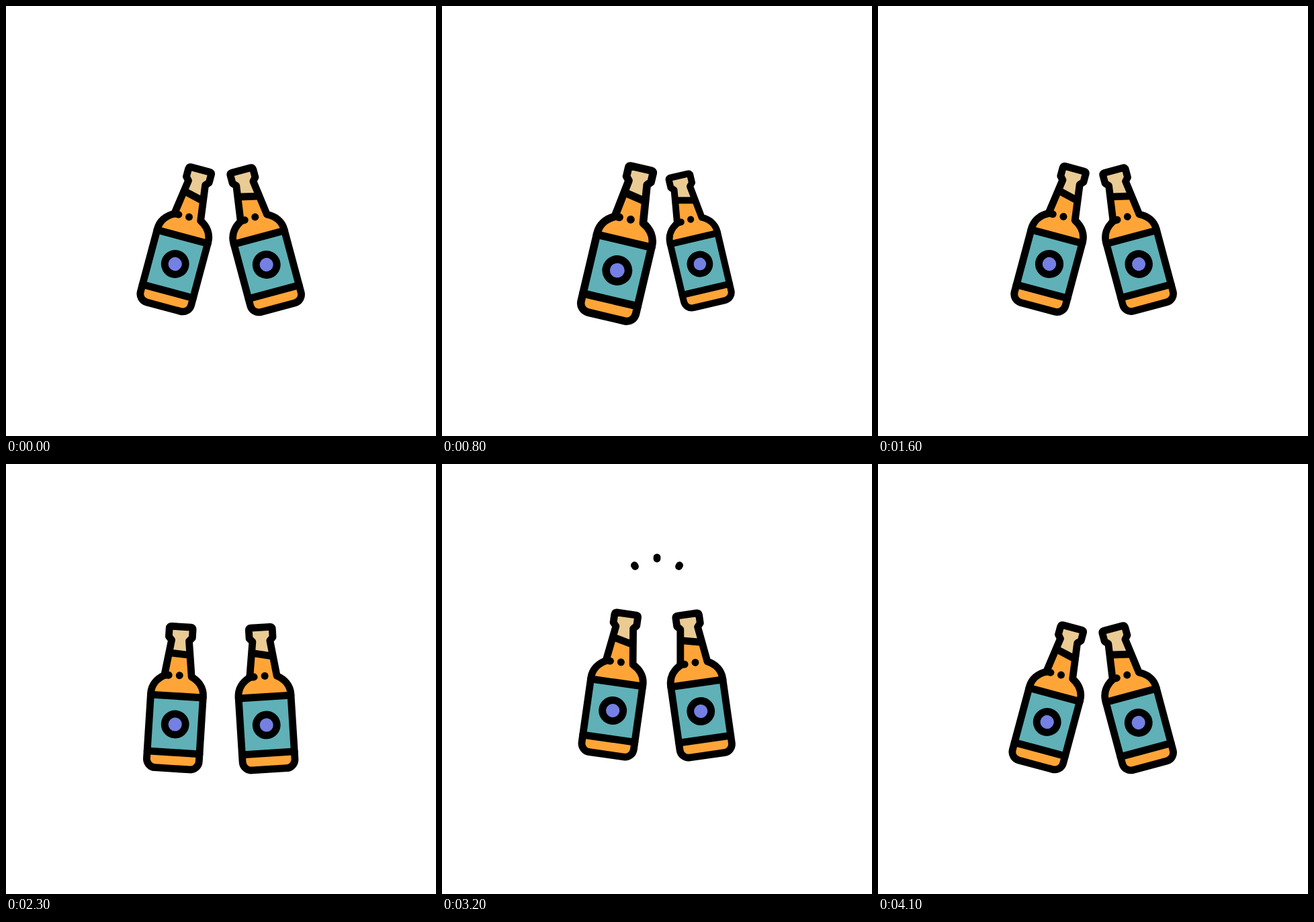
An HTML page for the animation above (4.2 s loop, 640 by 640 pixels).

```html
<!DOCTYPE html>
<html lang="en">
<head>
<meta charset="utf-8">
<title>Cheers</title>
<style>
  html, body { margin: 0; width: 100%; height: 100%; overflow: hidden; background: #fff; }
  svg { display: block; width: 100vw; height: 100vh; }
  .ink { fill: none; stroke: #000; stroke-width: 10.8; stroke-linecap: round; stroke-linejoin: round; }
</style>
</head>
<body>
<svg viewBox="0 0 640 640">
  <defs>
    <path id="shape" d="M-20.5-72L-13-125L-17.5-130V-142.5Q-17.5-145.5-14.5-145.5H14.5Q17.5-145.5 17.5-142.5V-130L13-125L20-72C32-66 39-56 39-44V53A13 13 0 0 1 26 66H-26A13 13 0 0 1-39 53V-44C-39-56-32-66-20.5-72Z"/>
    <clipPath id="inside"><use href="#shape"/></clipPath>
  </defs>
  <g id="bottles"></g>
  <g id="sparks" class="ink" transform="translate(320 204.5)"></g>
</svg>
<script>
  const NS = 'http://www.w3.org/2000/svg';
  const LOOP = 4200, STEP = 100, ORBIT = 1700;
  const stage = document.getElementById('bottles');
  const sparkBox = document.getElementById('sparks');

  const add = (parent, tag) => parent.appendChild(document.createElementNS(NS, tag));

  function makeBottle(slosh) {
    const g = add(stage, 'g');
    g.innerHTML = `
      <g clip-path="url(#inside)">
        <rect x="-50" y="-155" width="100" height="230" fill="#ffa538"/>
        <rect x="-50" y="-42" width="100" height="84" fill="#5fb1b7"/>
        <g class="level">
          <rect x="-50" y="-60" width="100" height="60" fill="#eacb94"/>
          <path class="ink" d="M-30 0H30"/>
        </g>
      </g>
      <use href="#shape" class="ink"/>
      <path class="ink" d="M-39-42H39M-39 42H39M-21-72.5H-14"/>
      <circle cx="2" cy="-73" r="5.5"/>
      <circle class="ink" r="15.5" style="fill:#7480e3"/>`;
    return { g, slosh, level: g.querySelector('.level') };
  }

  const left = makeBottle(10), right = makeBottle(1);
  const sparks = [-32, 0, 32].map(angle => {
    const line = add(sparkBox, 'line');
    line.setAttribute('transform', `rotate(${angle})`);
    return { line, inset: angle ? 2.2 : 0 };
  });

  // Timing helpers: progress, smooth step, half-sine bump, symmetric ease
  const part = (t, from, to) => Math.min(1, Math.max(0, (t - from) / (to - from)));
  const ramp = (t, from, to) => { const k = part(t, from, to); return k * k * (3 - 2 * k); };
  const bump = (t, from, to) => Math.sin(Math.PI * part(t, from, to));
  const ease = (u, n) => u < 0.5 ? (2 * u) ** n / 2 : 1 - (2 - 2 * u) ** n / 2;

  function place(bottle, x, y, lean, size, tilt) {
    bottle.g.setAttribute('transform', `translate(${x} ${y}) rotate(${lean}) scale(${size})`);
    bottle.level.setAttribute('transform', `translate(0 -105) rotate(${tilt})`);
  }

  function drawBottles(t) {
    const u = part(t, 0, ORBIT);
    const turn = 2 * Math.PI * ease(u, 2.07);
    const c = Math.cos(turn), s = Math.sin(turn);

    const drift = bump(t, 500, 1800);
    const windUp = bump(t, 2100, 2450);
    const jump = ramp(t, 2300, 2400) - ramp(t, 2900, 3500);

    const mid = 319.7 + 4 * drift;
    const half = (68 - 3 * drift - 8 * bump(t, 2300, 3300)) * c;
    const y = 384 + 8 * bump(t, 1700, 2400) - 34 * jump;
    const lean = (15 - 11.7 * windUp - 7 * bump(t, 2600, 3700)) * Math.sign(c) * Math.abs(c) ** 1.75;
    const tilt = b => 13 * c ** 4 - b.slosh * (Math.sin(2 * turn) / 2 + windUp);

    place(left, mid - half, y, lean, 1 - 0.2 * s, tilt(left));
    place(right, mid + half, y + 1 + 23.5 * s, -lean, 1 + 0.2 * s, tilt(right));

    const front = u > 0.5 && u < 1 ? left.g : right.g;
    if (stage.lastChild !== front) stage.appendChild(front);
  }

  function drawSparks(t) {
    const p = part(t, 2400, 3220);
    sparkBox.style.display = p > 0 && p < 1 ? '' : 'none';
    const inner = 22 + 43.6 * p ** 2;
    const outer = 22 + 43.6 * (1 - (1 - p) ** 3);
    for (const { line, inset } of sparks) {
      line.setAttribute('y1', inset - inner);
      line.setAttribute('y2', inset - outer);
    }
  }

  const start = performance.now();
  function tick() {
    const now = (performance.now() - start) % LOOP;
    const t = Math.floor(now / STEP) * STEP;
    drawBottles(t);
    drawSparks(t);
    requestAnimationFrame(tick);
  }
  tick();
</script>
</body>
</html>
```
